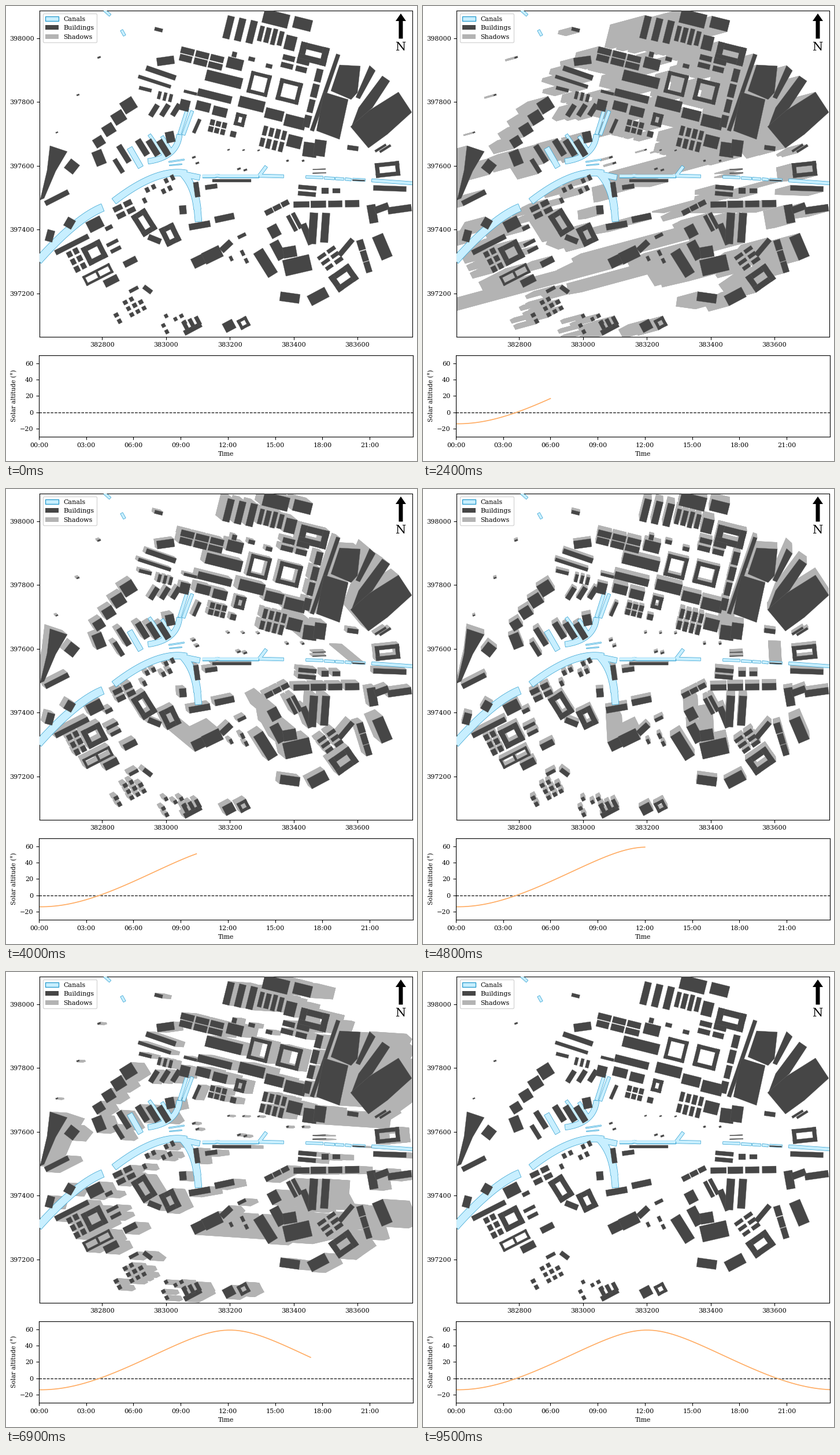
A matplotlib script that plays this animation: 711x788 px, repeating every 9.6 s.

```python
import numpy as np
import matplotlib.pyplot as plt
from matplotlib.animation import FuncAnimation
from matplotlib.collections import PolyCollection
from matplotlib.patches import Patch

W, H, DPI = 711, 788, 100
FRAMES, INTERVAL = 96, 100
SCALE = 0.552                      # map pixels per metre
LAT, DEC, NOON = np.radians(53.475), np.radians(22.4), 12.12
DARK, SHADE = "#464646", "#b3b3b3"
WATER, BANK = "#c8efff", "#2f9fd0"

rng = np.random.default_rng(4)
shapes, heights, canals = [], [], []


def add(outline, height):
    shapes.append(np.array(outline, float))
    heights.append(height)


def ribbon(width, start, end, bend=None):
    """Canal of constant width along a quadratic curve."""
    p0, p2 = np.array(start, float), np.array(end, float)
    p1 = (p0 + p2) / 2 if bend is None else np.array(bend, float)
    t = np.linspace(0, 1, 24)[:, None]
    mid = (1 - t) ** 2 * p0 + 2 * t * (1 - t) * p1 + t ** 2 * p2
    run = (1 - t) * (p1 - p0) + t * (p2 - p1)
    side = run[:, ::-1] * [-1, 1]
    side *= width / 2 / np.linalg.norm(side, axis=1, keepdims=True)
    canals.append(np.concatenate([mid + side, (mid - side)[::-1]]))


class District:
    """Buildings that share a street direction and a usual height."""

    def __init__(self, angle, height=18):
        self.angle, self.height = angle, height

    def place(self, x, y, local, turn=0):
        a = np.radians(self.angle + turn)
        spin = np.array([[np.cos(a), np.sin(a)], [-np.sin(a), np.cos(a)]])
        return np.array(local, float) @ spin + [x, y]

    def house(self, x, y, w, h, turn=0, height=None):
        box = np.array([[-1, -1], [1, -1], [1, 1], [-1, 1]]) * [w / 2, h / 2]
        add(self.place(x, y, box, turn), height or self.height)

    def grid(self, x, y, w, h, cols, rows, gap=3, fill=1.0, turn=0):
        """A block cut by alleys, with uneven houses and some empty plots."""
        cw, ch = (w + gap) / cols, (h + gap) / rows
        for c in range(cols):
            for r in range(rows):
                trim = rng.uniform(0, 0.15, 2)
                keep = rng.random() < fill
                local = [(c + 0.5) * cw - (w + gap) / 2,
                         (r + 0.5) * ch - (h + gap) / 2]
                if keep:
                    self.house(*self.place(x, y, local, turn),
                               (cw - gap) * (1 - trim[0]),
                               (ch - gap) * (1 - trim[1]), turn)

    def court(self, x, y, w, h, wall, turn=0):
        """Four wings around a yard."""
        for s in (-1, 1):
            across = self.place(x, y, [0, s * (h - wall) / 2], turn)
            along = self.place(x, y, [s * (w - wall) / 2, 0], turn)
            self.house(*across, w, wall, turn)
            self.house(*along, wall, h, turn)

    def row(self, start, end, count, w, h, turn=0, taper=1.0):
        """Equal buildings along a line, shrinking by taper towards its end."""
        for t in np.linspace(0, 1, count):
            x, y = (1 - t) * np.array(start) + t * np.array(end)
            k = 1 + (taper - 1) * t
            self.house(x, y, w * k, h * k, turn)


def build_north():
    mills = District(14, 34)
    mills.row((385, 37), (425, 45), 3, 12, 40)
    mills.house(467, 22, 45, 24)
    mills.house(513, 31, 32, 20)
    mills.grid(458, 52, 44, 29, 4, 1)
    mills.house(492, 64, 19, 25)

    lofts = District(14, 22)
    lofts.court(532, 83, 50, 32, 11)
    lofts.grid(500, 100, 48, 24, 2, 2)
    lofts.grid(338, 91, 78, 25, 3, 2, gap=1)
    lofts.house(396, 100, 28, 19)
    lofts.house(377, 127, 64, 19)
    lofts.house(361, 156, 60, 13)
    lofts.house(425, 170, 45, 19)
    lofts.row((341, 174), (370, 183), 2, 25, 16)
    lofts.row((464, 188), (500, 201), 2, 32, 18, taper=1.15)
    lofts.grid(531, 160, 12, 106, 1, 4)
    lofts.house(552, 150, 7, 140, turn=5)
    lofts.grid(462, 230, 42, 38, 4, 2)
    lofts.house(499, 235, 25, 21)

    terraces = District(14, 13)
    terraces.house(276, 95, 30, 14, turn=-22)
    terraces.house(268, 116, 54, 9, turn=5)
    terraces.house(257, 131, 59, 6, turn=4)
    terraces.house(241, 144, 22, 6)
    terraces.house(319, 150, 23, 5)
    terraces.court(438, 135, 36, 38, 6)
    terraces.court(490, 148, 40, 38, 7)
    terraces.grid(275, 157, 26, 15, 3, 1, gap=4)
    terraces.row((256, 181), (294, 180), 3, 9, 23, turn=18)
    terraces.house(309, 172, 17, 19)
    terraces.house(330, 208, 6, 26, turn=10)
    terraces.grid(366, 210, 30, 22, 3, 2, gap=2)
    terraces.court(405, 197, 18, 22, 6)
    terraces.row((425, 92), (455, 104), 2, 11, 7)
    terraces.house(393, 222, 10, 10)
    terraces.house(395, 84, 8, 9)
    terraces.house(264, 41, 14, 6)


def build_north_east():
    add([(577, 102), (613, 104), (608, 150), (597, 162), (562, 147)], 35)
    add([(550, 149), (592, 162), (577, 231), (537, 216)], 35)
    add([(629, 103), (639, 112), (612, 161), (605, 158)], 55)
    add([(651, 121), (664, 130), (634, 176), (598, 208), (610, 176)], 40)
    add([(679, 149), (702, 184), (660, 222), (627, 246), (596, 209),
         (628, 181)], 38)
    station = District(8, 15)
    station.house(526, 249, 24, 25, height=110)
    station.house(543, 246, 20, 28, height=30)
    station.house(600, 246, 19, 8)
    station.row((648, 246), (656, 247), 2, 22, 4, turn=-40)
    station.grid(542, 286, 24, 8, 1, 2, gap=5, turn=-10)
    station.court(660, 283, 42, 25, 7, turn=-14)
    station.house(664, 316, 57, 9, turn=-6)
    station.house(610, 302, 21, 2, turn=-6, height=115)


def build_west():
    wharf = District(-32, 20)
    wharf.row((212, 172), (161, 235), 4, 24, 22, taper=0.75)
    wharf.house(161, 263, 18, 26, turn=10)
    wharf.row((204, 256), (195, 277), 2, 10, 34, taper=0.8)
    wharf.row((236, 245), (273, 246), 3, 11, 31)
    wharf.house(284, 227, 15, 19, turn=20)

    add([(76, 242), (106, 252), (86, 286), (66, 333), (59, 336), (71, 285)], 26)
    yards = District(-27, 20)
    yards.house(114, 278, 19, 20, turn=65)
    yards.house(88, 332, 45, 9)
    yards.house(76, 398, 13, 20, turn=42)
    yards.house(110, 376, 15, 17, turn=57)
    yards.house(154, 378, 27, 20)
    yards.house(114, 413, 64, 9)
    yards.grid(122, 440, 22, 40, 2, 3)
    yards.court(153, 427, 36, 34, 9)
    yards.court(159, 465, 52, 18, 4)
    yards.house(159, 465, 4, 14)
    yards.house(182, 476, 26, 13)
    yards.house(215, 443, 24, 11)
    yards.grid(187, 416, 22, 20, 1, 2, gap=6)
    yards.house(178, 384, 13, 7)


def build_south():
    estate = District(-28, 20)
    estate.grid(212, 524, 56, 32, 5, 3, gap=4, fill=0.65)
    estate.house(245, 491, 17, 8, turn=65)
    estate.house(221, 491, 17, 6)
    estate.grid(288, 545, 42, 32, 4, 3, gap=5, fill=0.5)
    estate.house(323, 559, 33, 9)
    estate.row((310, 553), (332, 545), 3, 7, 16)
    estate.house(386, 554, 19, 17)
    estate.court(411, 549, 18, 18, 5)
    estate.house(491, 505, 34, 16, turn=36)
    estate.house(540, 503, 34, 19)


def build_waterside():
    basin = District(-26, 18)
    basin.grid(205, 352, 36, 24, 2, 2)
    basin.grid(264, 317, 68, 24, 6, 2, gap=5, fill=0.7)
    basin.court(239, 375, 28, 42, 9, turn=-6)
    basin.house(257, 404, 23, 10, turn=48)
    basin.court(284, 396, 27, 34, 9)
    basin.house(306, 353, 12, 15, turn=21)
    basin.house(330, 318, 9, 26, turn=18)
    basin.house(355, 313, 21, 8, turn=18)
    basin.house(391, 302, 67, 5, turn=26)
    basin.house(335, 380, 37, 11, turn=16)
    basin.house(378, 367, 34, 11, turn=14)
    basin.house(333, 442, 22, 18, height=160)
    basin.house(357, 431, 33, 21, height=60)
    basin.house(381, 416, 23, 11, turn=-17)
    basin.house(408, 398, 15, 6)
    basin.grid(406, 446, 28, 40, 3, 3, gap=5, fill=0.6)


def build_centre():
    offices = District(0, 20)
    offices.grid(521, 320, 36, 19, 1, 2, turn=5)
    offices.grid(562, 320, 34, 10, 2, 1, gap=5)
    offices.grid(555, 343, 116, 12, 4, 1, gap=1, turn=-1)
    offices.grid(469, 349, 46, 10, 3, 1, gap=1, turn=-27)
    offices.house(634, 360, 15, 32, turn=-10)
    offices.house(650, 350, 25, 12, turn=-20)
    offices.house(681, 352, 41, 12, turn=-8)

    core = District(-28, 30)
    core.house(464, 390, 18, 21, height=110)
    core.grid(499, 374, 17, 34, 2, 1, gap=2)
    core.house(521, 395, 11, 38, turn=6)
    core.row((531, 385), (552, 384), 2, 14, 54, turn=32, taper=0.95)
    core.house(449, 445, 19, 49, turn=-4)
    core.house(471, 423, 17, 33, height=50)
    core.house(491, 426, 23, 19, turn=18, height=130)
    core.house(504, 449, 47, 28, turn=15, height=40)


def build_south_east():
    fringe = District(-35, 26)
    fringe.grid(561, 437, 36, 30, 2, 3, gap=4)
    fringe.house(588, 418, 36, 9, turn=-15)
    fringe.court(584, 471, 42, 32, 10)
    fringe.grid(620, 433, 12, 60, 1, 3, gap=0, turn=18)
    fringe.house(651, 417, 20, 43, turn=12, height=40)


def build_sheds():
    sheds = District(-20, 9)
    sheds.row((385, 249), (437, 250), 3, 4, 2)
    sheds.row((88, 219), (161, 89), 3, 4, 2, taper=1.4)
    sheds.row((325, 262), (331, 272), 2, 6, 3)
    sheds.row((403, 282), (414, 284), 2, 6, 3)
    sheds.row((487, 268), (514, 268), 2, 4, 3)


def dig_canals():
    ribbon(13, (56, 441), (167, 349), bend=(122, 367))
    ribbon(11, (187, 338), (312, 290), bend=(262, 280))
    ribbon(9, (306, 291), (335, 297))
    ribbon(12, (305, 289), (331, 352), bend=(327, 312))
    ribbon(11, (331, 351), (333, 373))
    ribbon(5, (340, 294), (437, 294))
    ribbon(5, (438, 294), (450, 278))
    ribbon(5, (438, 294), (480, 295))
    ribbon(9, (300, 223), (246, 269), bend=(296, 262))
    ribbon(9, (214, 246), (233, 279))
    for start, end in [((248, 223), (274, 260)), ((270, 226), (287, 253)),
                       ((314, 178), (300, 222)), ((322, 182), (307, 223))]:
        ribbon(5, start, end)
    for x, length in zip((519, 551, 570, 587, 600), (29, 17, 14, 10, 21)):
        y = 296 + (x - 519) * 0.055
        ribbon(4, (x, y), (x + length, y + 1))
    ribbon(5, (633, 302), (703, 307))
    ribbon(4, (170, 7), (180, 16))
    ribbon(4, (200, 42), (205, 51))
    ribbon(1.5, (282, 270), (308, 266))
    ribbon(1, (283, 276), (304, 274))


for build in (build_north, build_north_east, build_west, build_south,
              build_waterside, build_centre, build_south_east, build_sheds,
              dig_canals):
    build()

starts = np.concatenate(shapes)
ends = np.concatenate([np.roll(s, -1, axis=0) for s in shapes])
edge_heights = np.repeat(heights, [len(s) for s in shapes])[:, None]


def sun(hour):
    """East, north and up parts of the direction to the sun."""
    angle = np.radians(15 * (hour - NOON))
    east = -np.cos(DEC) * np.sin(angle)
    to_north = (np.sin(DEC) * np.cos(LAT)
                - np.cos(DEC) * np.cos(angle) * np.sin(LAT))
    up = (np.sin(DEC) * np.sin(LAT)
          + np.cos(DEC) * np.cos(angle) * np.cos(LAT))
    return east, to_north, up


def cast(hour):
    """Every outline swept along the shadow direction."""
    east, to_north, up = sun(hour)
    if up <= 0:
        return []
    step = np.array([-east, to_north]) / up * SCALE
    shift = edge_heights * step
    sides = np.stack([starts, ends, ends + shift, starts + shift], axis=1)
    roofs = [s + h * step for s, h in zip(shapes, heights)]
    return list(sides) + roofs


def axes_at(left, top, right, bottom):
    return fig.add_axes([left / W, 1 - bottom / H,
                         (right - left) / W, (bottom - top) / H])


def layer(polygons, color, width, zorder, edge=None):
    item = PolyCollection(polygons, facecolor=color, edgecolor=edge or color,
                          linewidth=width, zorder=zorder)
    city.add_collection(item, autolim=False)
    return item


plt.rcParams.update({"font.family": "DejaVu Serif", "font.size": 8})
fig = plt.figure(figsize=(W / DPI, H / DPI), dpi=DPI, facecolor="white")

# Map, drawn in stage pixels
city = axes_at(58.5, 7.5, 702.5, 572.5)
city.set_xlim(58.5, 702.5)
city.set_ylim(572.5, 7.5)
city.set_xticks(166.3 + 110.4 * np.arange(5),
                [str(382800 + 200 * i) for i in range(5)])
city.set_yticks(56 + 110.4 * np.arange(5),
                [str(398000 - 200 * i) for i in range(5)])
shadows = layer([], SHADE, 0.3, 1)
layer(canals, BANK, 1.0, 2)        # banks below, so joined canals merge
layer(canals, WATER, 0, 3)
layer(shapes, DARK, 0.25, 4, edge="#606060")
city.legend(handles=[Patch(facecolor=WATER, edgecolor=BANK, label="Canals"),
                     Patch(color=DARK, label="Buildings", linewidth=0),
                     Patch(color=SHADE, label="Shadows", linewidth=0)],
            loc="upper left").set_zorder(5)
city.fill([683, 692, 686.5, 686.5, 679.5, 679.5, 674],
          [13, 26, 26, 56.5, 56.5, 26, 26], color="black", linewidth=0, zorder=5)
city.text(683.3, 77, "N", fontsize=15, ha="center", va="baseline", zorder=5)

# Solar altitude through the day
chart = axes_at(57, 604.5, 704, 746)
chart.set_xlim(0, 23.75)
chart.set_ylim(-30, 70)
chart.set_xticks(range(0, 24, 3), [f"{h:02d}:00" for h in range(0, 24, 3)])
chart.set_yticks(range(-20, 61, 20))
chart.set_xlabel("Time", fontsize=7.8)
chart.set_ylabel("Solar altitude (°)", fontsize=7.7, labelpad=3)
chart.axhline(0, color="black", linestyle="--", linewidth=0.9)
curve, = chart.plot([], [], color="#ffab61", linewidth=1.2)

hours = np.arange(FRAMES) / 4
altitude = np.degrees(np.arcsin(sun(hours)[2]))


def update(i):
    shadows.set_verts(cast(hours[i]))
    curve.set_data(hours[:i + 1], altitude[:i + 1])
    return shadows, curve


anim = FuncAnimation(fig, update, frames=FRAMES, interval=INTERVAL,
                     init_func=lambda: update(0), repeat=True)
plt.show()
```
